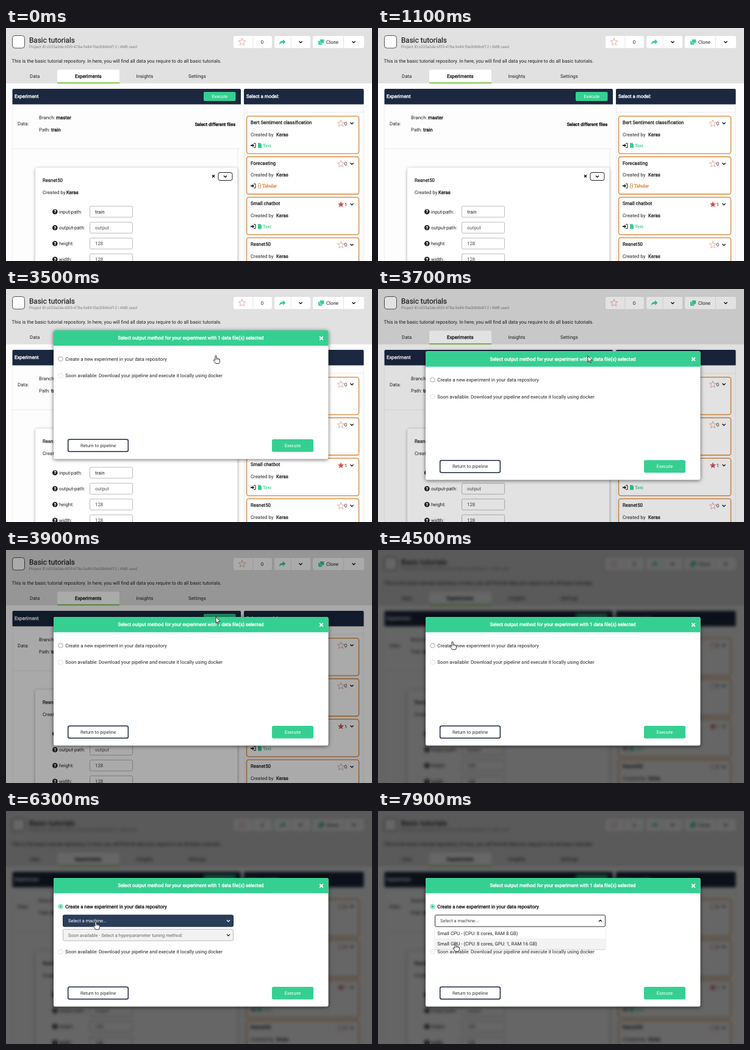
An HTML page with a canvas for the animation above (8 s loop, 600x383 px).

```html
<!DOCTYPE html>
<html lang="en">
<head>
<meta charset="utf-8">
<title>Run an experiment</title>
<style>
html, body { margin: 0; width: 600px; height: 383px; overflow: hidden; background: #fff; }
canvas { display: block; }
</style>
</head>
<body>
<canvas id="stage" width="600" height="383"></canvas>
<script>
const W = 600, H = 383, LOOP = 8000;
const SANS = 'Roboto, sans-serif', SERIF = '"Liberation Serif", serif';
const BODY = 7.875, BUTTON = 7.5;
const NAVY = '#1b2840', GREEN = '#36cf92', INK = '#222', ORANGE = '#e0964f', RED = '#d2504c';

const stage = document.getElementById('stage').getContext('2d');
const page = document.createElement('canvas');
page.width = W;
page.height = H;
let g = stage;

const clamp = v => Math.max(0, Math.min(1, v));
const smooth = v => { v = clamp(v); return v * v * (3 - 2 * v); };

// y is the middle of the capitals
function text(str, x, y, { size = BODY, color = INK, bold = 0, align = 'left', font = SANS } = {}) {
  g.font = `${size}px ${font}`;
  g.textRendering = 'geometricPrecision';
  g.textAlign = align;
  g.fillStyle = g.strokeStyle = color;
  g.lineJoin = 'round';
  const base = y + size * 0.355;
  g.fillText(str, x, base);
  if (bold) {
    g.lineWidth = bold;
    g.strokeText(str, x, base);
  }
}

const strong = (str, x, y, opts) => text(str, x, y, { bold: 0.4, ...opts });

function rect(x, y, w, h, fill) {
  g.fillStyle = fill;
  g.fillRect(x, y, w, h);
}

function box(x, y, w, h, r, fill, border, width = 1) {
  g.beginPath();
  g.roundRect(x, y, w, h, r);
  if (fill) { g.fillStyle = fill; g.fill(); }
  if (border) { g.strokeStyle = border; g.lineWidth = width; g.stroke(); }
}

function shadowBox(x, y, w, h, r, fill, blur, color) {
  g.save();
  g.shadowColor = color;
  g.shadowBlur = blur;
  g.shadowOffsetY = 1;
  box(x, y, w, h, r, fill);
  g.restore();
}

function line(points, color, width) {
  g.beginPath();
  points.forEach(([x, y]) => g.lineTo(x, y));
  g.strokeStyle = color;
  g.lineWidth = width;
  g.stroke();
}

function disc(x, y, r, fill, border, width = 0.9) {
  g.beginPath();
  g.arc(x, y, r, 0, 7);
  if (fill) { g.fillStyle = fill; g.fill(); }
  if (border) { g.strokeStyle = border; g.lineWidth = width; g.stroke(); }
}

function shape(d, x, y, fill, border, width) {
  g.save();
  g.translate(x, y);
  const path = new Path2D(d);
  if (fill) { g.fillStyle = fill; g.fill(path); }
  if (border) { g.strokeStyle = border; g.lineWidth = width; g.lineJoin = 'round'; g.stroke(path); }
  g.restore();
}

function chevron(x, y, color = '#111', dir = 1) {
  line([[x - 2.6, y - 1.3 * dir], [x, y + 1.3 * dir], [x + 2.6, y - 1.3 * dir]], color, 1.3);
}

function cross(x, y, r, color, width) {
  line([[x - r, y - r], [x + r, y + r]], color, width);
  line([[x + r, y - r], [x - r, y + r]], color, width);
}

function star(x, y, r, solid) {
  g.beginPath();
  for (let i = 0; i < 10; i++) {
    const a = i * Math.PI / 5 - Math.PI / 2, d = i % 2 ? r * 0.42 : r;
    g.lineTo(x + d * Math.cos(a), y + d * Math.sin(a));
  }
  g.closePath();
  g.lineJoin = 'miter';
  g.lineWidth = 0.7;
  g.strokeStyle = solid ? RED : '#dc8a80';
  g.fillStyle = RED;
  if (solid) g.fill();
  g.stroke();
}

function header() {
  rect(0, 0, W, 91, '#e2e1e2');
  box(10.5, 12.5, 20, 20.5, 4, '#fff', '#555', 1);
  text('Basic tutorials', 38, 20, { size: 11.8, bold: 0.25 });
  text('Project ID:c035a3de-6f09-478a-9e84-f0a0084b6f12 | 4MB used', 38, 31, { size: 6.3, color: '#808080' });
  text('This is the basic tutorial repository. In here, you will find all data you require to do all basic tutorials.', 9.5, 54);

  [[373, 63, 404.5], [440, 59, 466.5], [503, 84, 553]].forEach(([x, w, split]) => {
    box(x, 13, w, 20, 3, '#fff');
    rect(split, 13, 1, 20, '#e6e6e6');
  });
  star(387, 23, 6.3);
  text('0', 420, 23, { align: 'center' });
  shape('M-5 4 Q-5 -2 1 -2 V-4.5 L5.5 -.3 L1 3.8 V1.3 Q-3 1 -5 4Z', 453, 23, GREEN);
  chevron(483, 23);
  box(512, 21, 6.5, 6.5, 1, GREEN);
  box(514.5, 18.5, 7, 6.5, 1, GREEN, '#fff', 0.6);
  text('Clone', 525, 23);
  chevron(570, 23);

  box(84, 68.5, 102, 23, [3, 3, 0, 0], '#fff');
  rect(84, 89.3, 102, 1.9, '#7ac143');
  text('Data', 39, 79.5);
  strong('Experiments', 113, 79);
  text('Insights', 213.5, 79.5);
  text('Settings', 299, 79.5);
}

function executeButton(hover) {
  box(324, 105, 52.5, 15, 2, hover ? '#31bd85' : GREEN);
  text('Execute', 350.3, 112.7, { size: 7.3, color: '#fff', align: 'center' });
}

function field(label, value, y, color) {
  disc(80.3, y, 4.3, '#1c1c1c');
  text('?', 80.3, y, { size: 7, color: '#fff', bold: 0.5, align: 'center' });
  text(label, 87, y);
  box(137.5, y - 9, 70, 18, 2, '#fff', '#b4b4b4', 0.9);
  text(value, 146, y + 0.3, { color });
}

function experimentPanel() {
  box(10.5, 100, 374.5, 25.5, [2, 2, 0, 0], NAVY);
  strong('Experiment', 14, 112.7, { color: '#fff' });
  executeButton(false);
  rect(10, 125.5, 1, 258, '#f0f0f0');
  rect(10, 198, 373, 1, '#ececec');
  rect(379.5, 198, 1, 185, '#ececec');

  text('Data:', 19, 157.5);
  text('Branch:', 54, 147.5);
  strong('master', 82, 147.5);
  text('Path:', 54, 167.3);
  strong('train', 74, 167.3);
  strong('Select different files', 376, 158, { size: BUTTON, align: 'right', color: '#111' });

  shadowBox(48, 229.5, 331.5, 180, 4, '#fff', 5, 'rgba(0,0,0,.35)');
  strong('Resnet50', 60, 250.5, { bold: 0.25 });
  text('Created by', 60, 270.5);
  strong('Keras', 99, 270.5);
  cross(340, 243.5, 2, '#111', 1.4);
  box(348, 237.5, 23, 13, 3, '#fff', '#222', 1);
  chevron(359.5, 244);

  field('input-path:', 'train', 302, INK);
  field('output-path:', 'output', 328.2, '#555');
  field('height:', '128', 354.2, '#444');
  field('width:', '128', 380.2, '#444');
}

function modelCard(index, title, kind, liked) {
  const y = 145 + index * 66.6;
  box(394.5, y, 184, 61.5, 3.5, '#fff', ORANGE, 1.6);
  strong(title, 401, y + 10.3, { bold: 0.3 });
  star(549, y + 12, liked ? 4.6 : 6, liked);
  text(liked ? '1' : '0', 557, y + 11.8, { align: 'center' });
  chevron(567, y + 11.5);
  text('Created by', 401, y + 30);
  strong('Keras', 443, y + 30, { bold: 0.3 });

  const iconY = y + 48;
  shape('M-4 -1 H-1 V-3 L2 0 L-1 3 V1 H-4Z', 405, iconY, '#222');
  shape('M1 -3.4 H4 V3.4 H1', 405, iconY, null, '#222', 1);
  if (kind === 'Text') {
    shape('M-3 -4 H1 L3 -2 V4 H-3Z', 416, iconY, GREEN);
    text(kind, 421, iconY, { color: GREEN, font: SERIF, bold: 0.2 });
  } else {
    box(413.5, iconY - 3.8, 4, 7.6, 1, null, ORANGE, 1);
    line([[413.5, iconY], [417.5, iconY]], ORANGE, 1);
    text(kind, 420, iconY, { color: ORANGE, font: SERIF, bold: 0.5 });
  }
}

function modelPanel() {
  box(390, 100, 196.5, 25.5, [2, 2, 0, 0], NAVY);
  strong('Select a model:', 394, 112.7, { color: '#fff' });
  rect(390, 125.5, 1, 258, '#ececec');
  rect(585.5, 125.5, 1, 258, '#ececec');
  rect(390, 138, 196, 1, '#ececec');
  modelCard(0, 'Bert Sentiment classification', 'Text');
  modelCard(1, 'Forecasting', 'Tabular');
  modelCard(2, 'Small chatbot', 'Text', true);
  modelCard(3, 'Resnet50', 'Text');
}

function buildPage() {
  g = page.getContext('2d');
  rect(0, 0, W, H, '#fdfdfd');
  header();
  experimentPanel();
  modelPanel();
  g = stage;
}

function backdrop(t) {
  g.drawImage(page, 0, 0);
  const dim = clamp((t - 3600) / 540);
  if (!dim) return;
  g.save();
  g.filter = `blur(${2.4 * dim * dim}px)`;
  g.drawImage(page, 0, 0);
  g.restore();
  rect(0, 0, W, H, `rgba(0,0,0,${0.6 * dim})`);
}

function select(label, y, { fill = '#fff', border = '#333', color = '#444', dir = 1 } = {}) {
  box(93.5, y, 279, 19, 2, fill, border, 1);
  text(label, 102, y + 9.6, { size: BUTTON, color });
  chevron(364.5, y + 9.6, color === '#fff' ? color : '#222', dir);
}

function modal(t) {
  if (t < 3400) return;
  const chosen = t >= 5400, open = t >= 6900;
  const hover = t >= 6000 && t < 7600;
  g.save();
  g.globalAlpha = clamp((t - 3350) / 120);
  g.translate(0, 50 * (smooth((t - 3400) / 400) - 1));

  shadowBox(78, 110, 450.5, 211.5, 3, '#fff', 6, 'rgba(0,0,0,.6)');
  box(78, 110, 450.5, 25.3, [3, 3, 0, 0], GREEN);
  strong('Select output method for your experiment with 1 data file(s) selected', 303, 122.7, { color: '#fff', align: 'center' });
  cross(517, 123, 2.8, '#fff', 1.8);

  disc(89.5, 157, 3.7, '#fff', chosen ? GREEN : '#999');
  if (chosen) disc(89.5, 157, 2.2, GREEN);
  strong('Create a new experiment in your data repository', 97.3, 157, { bold: chosen ? 0.4 : 0 });

  const second = chosen ? 231.5 : 184.5;
  disc(89.5, second, 3.7, '#fff', '#ddd');
  text('Soon available: Download your pipeline and execute it locally using docker', 97.3, second);

  if (chosen) {
    select('Select a machine...', 171, hover
      ? { fill: '#2a3e5c', border: NAVY, color: '#fff', dir: open ? -1 : 1 }
      : { dir: open ? -1 : 1 });
    select('Soon available - Select a hyperparameter tuning method:', 194.3, { fill: '#f2f2f2', border: '#bbb', color: '#666' });
  }
  if (open) {
    shadowBox(93, 191.5, 280, 35.5, 0, '#fff', 2, 'rgba(0,0,0,.2)');
    if (t >= 7750) rect(93, 209.5, 280, 17.5, '#f3f3f3');
    text('Small CPU - (CPU: 8 cores, RAM 8 GB)', 97.3, 201);
    text('Small GPU - (CPU: 8 cores, GPU: 1, RAM 16 GB)', 97.3, 218);
  }

  box(101.7, 289.3, 98.6, 20, 2.5, '#fff', NAVY, 1.5);
  text('Return to pipeline', 151, 299.5, { size: BUTTON, align: 'center', color: '#333' });
  box(436, 289, 68, 20.7, 2.5, GREEN);
  text('Execute', 470, 299.5, { size: BUTTON, align: 'center', color: '#fff' });
  g.restore();
}

// time, x, y of the pointer tip
const TRACK = [
  [1900, 425, 340], [2160, 347, 112], [2800, 347, 112], [3300, 344, 109.5], [3950, 344, 110],
  [4450, 122, 151], [5800, 122, 151], [6200, 147, 182], [7580, 147, 182], [7850, 127, 218]
];
const HAND = 'M-1.1 7.6 V.9 Q-1.1 -.2 0 -.2 Q1.1 -.2 1.1 .9 V4.6 Q1.5 4 2.3 4.2 Q3 4.4 3 5 ' +
  'Q4.7 4.4 4.9 5.6 Q6.4 5.2 6.4 6.6 V9.2 Q6.4 11 5.4 12.8 H-.2 Q-1.2 10.8 -3.4 8.2 Q-4 7 -3.2 6.7 Q-2.2 6.4 -1.1 7.6Z';
const ARROW = 'M0 0 V10.2 L2.3 8 L3.9 11.6 L5.5 10.9 L4 7.4 H7.2Z';

function pointer(t) {
  if (t < TRACK[0][0]) return;
  let i = 0;
  while (i < TRACK.length - 2 && t >= TRACK[i + 1][0]) i++;
  const [t0, x0, y0] = TRACK[i], [t1, x1, y1] = TRACK[i + 1];
  const p = smooth((t - t0) / (t1 - t0));
  const x = x0 + (x1 - x0) * p, y = y0 + (y1 - y0) * p;
  const arrow = t < 2100 || (t >= 3600 && t < 4350);
  if (arrow) {
    shape(ARROW, x, y, '#fff', '#111', 0.8);
  } else {
    shape(HAND, x, y, '#fff', '#222', 0.9);
    line([[x + 1.1, y + 4.6], [x + 1.1, y + 7]], '#222', 0.6);
    line([[x + 3, y + 5], [x + 3, y + 7]], '#222', 0.6);
    line([[x + 4.9, y + 5.6], [x + 4.9, y + 7.2]], '#222', 0.6);
  }
}

function draw(now) {
  const t = now % LOOP;
  backdrop(t);
  if (t >= 2100 && t < 3400) executeButton(true);
  modal(t);
  pointer(t);
  requestAnimationFrame(draw);
}

buildPage();
requestAnimationFrame(draw);
</script>
</body>
</html>
```
